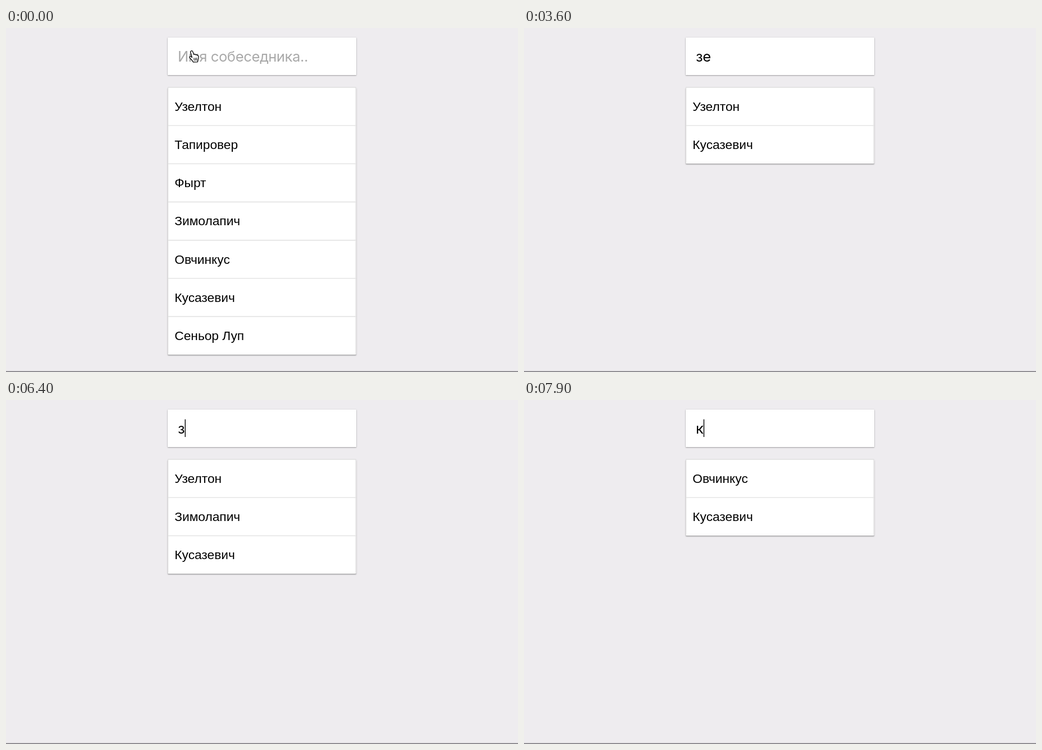
An HTML page for the animation above (8000 ms loop, 912 px wide and 614 px high).

```html
<!DOCTYPE html>
<html lang="ru">
<head>
<meta charset="utf-8">
<title>Поиск собеседника</title>
<style>
  html, body { margin: 0; width: 100%; height: 100%; overflow: hidden; background: #eeecef; }
  #stage { position: absolute; left: 0; top: 0; width: 912px; height: 614px; overflow: hidden; }
  .card {
    position: absolute; left: 288px; width: 335.5px; background: #fff;
    box-shadow: 0 1.4px 2px rgba(0, 0, 0, .32), 0 0 1.4px rgba(0, 0, 0, .16);
  }
  #field { top: 16.5px; height: 67px; }
  #list { top: 105.5px; border-radius: 1.5px; }
  svg { position: absolute; left: 0; top: 0; }
  #rows text { font: 22.72px "Liberation Sans", Arial, sans-serif; fill: #000; }
  #rows line { stroke: #e0e0e0; stroke-width: 1.4; }
  #query { font: 25.56px Inter, Roboto, sans-serif; letter-spacing: -.015em; fill: #000; }
  #query.empty { fill: #a9a9a9; }
</style>
</head>
<body>
<div id="stage">
  <div id="field" class="card"></div>
  <div id="list" class="card"></div>
  <svg width="912" height="614" viewBox="0 0 912 614">
    <g id="rows"></g>
    <text id="query" x="306" y="60"></text>
    <rect id="caret" y="34.5" width="1.4" height="31.5"/>
    <g id="hand" stroke="#000" stroke-width="1.3" stroke-linejoin="round" stroke-linecap="round">
      <path fill="#fff" d="M328.5 42.7C329.3 40 332 40 332.8 42.5L334.6 47.3C335.5 46.3 337.4 46.6 337.9 47.9
        C338.8 47.2 340.2 47.6 340.6 48.8C341.6 48.4 342.6 49.1 342.8 50.4C343.3 53.4 342.9 55.4 341.8 57.8
        L341.2 60.6L333.6 60.9C332.6 58.6 329.6 56 327.2 53.2C326 51.6 327.6 50 329.4 51L331.4 52.6Z"/>
      <path fill="none" stroke-width="1" d="M334.8 53.8l.5 4.2M337.3 53.6l.4 4.2M339.7 53.4l.1 4.2"/>
    </g>
    <path d="M0 613.3H912" stroke="#77757a" stroke-width="1.4"/>
  </svg>
</div>
<script>
const LOOP = 8000, TOP = 105.5, PITCH = 68.17;
const HINT = 'Имя собеседника..';
const NAMES = ['Узелтон', 'Тапировер', 'Фырт', 'Зимолапич', 'Овчинкус', 'Кусазевич', 'Сеньор Луп'];

// [start ms, typed text, caret shown]
const STEPS = [
  [0, '', 0], [300, '', 1], [800, '', 0], [1300, '', 1], [1800, '', 0],
  [2000, 'з', 1], [2500, 'з', 0], [3000, 'з', 1],
  [3100, 'зе', 1], [3600, 'зе', 0],
  [4000, 'зел', 1], [4600, 'зел', 0], [5000, 'зел', 1], [5500, 'зел', 0],
  [6000, 'зе', 1], [6400, 'з', 1],
  [6900, '', 1], [7400, '', 0], [7900, 'к', 1]
];
const HAND_END = 2000;

const $ = id => document.getElementById(id);
const query = $('query'), caret = $('caret'), rows = $('rows');

function drawList(text) {
  const found = NAMES.filter(name => name.toLowerCase().includes(text));
  $('list').style.height = found.length * PITCH + 'px';
  rows.innerHTML = found.map((name, i) => {
    const y = TOP + i * PITCH;
    return `<line x1="288" x2="623.5" y1="${y + .5}" y2="${y + .5}"/>` +
      `<text x="300.3" y="${y + 42.4}">${name}</text>`;
  }).join('') +
    `<path d="M288.7 ${TOP}v${found.length * PITCH}M622.8 ${TOP}v${found.length * PITCH}" stroke="#e0e0e0" stroke-width="1.2"/>`;
}

let shown = null;
function show(step) {
  const [start, text, caretOn] = step;
  drawList(text);
  query.textContent = text || HINT;
  query.classList.toggle('empty', !text);
  caret.setAttribute('x', 306.3 + (text ? query.getComputedTextLength() : 0));
  caret.style.visibility = caretOn ? 'visible' : 'hidden';
  $('hand').style.visibility = start < HAND_END ? 'visible' : 'hidden';
  shown = step;
}

const origin = performance.now();
function frame() {
  const t = (performance.now() - origin) % LOOP;
  const step = STEPS.filter(s => s[0] <= t).pop();
  if (step !== shown) show(step);
  requestAnimationFrame(frame);
}
show(STEPS[0]);
requestAnimationFrame(frame);
</script>
</body>
</html>
```
